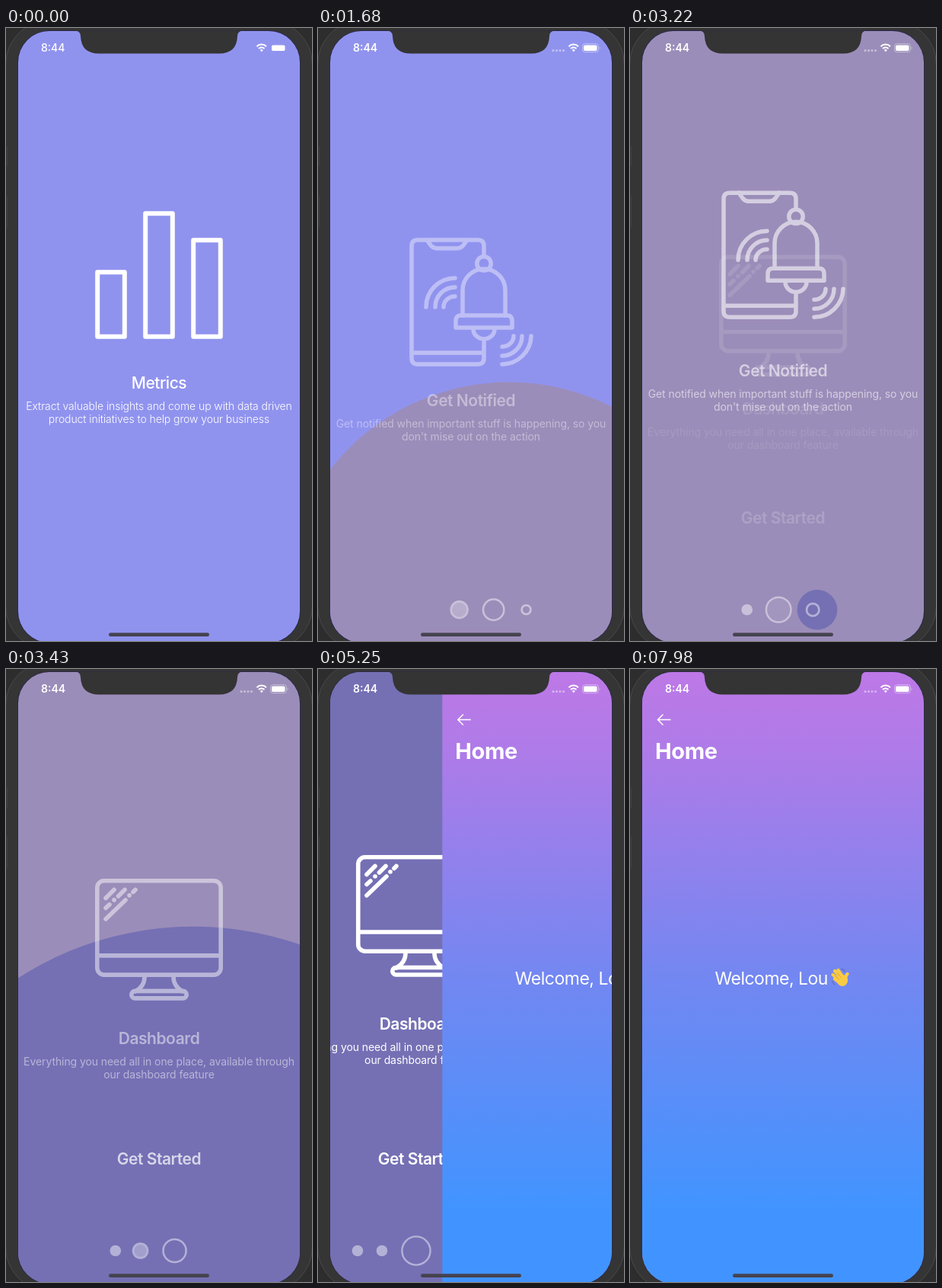
Recreate the animation shown at these times as an HTML page. Size 402 px wide and 804 px high, loop 8 s.

```html
<!DOCTYPE html>
<html lang="en">
<head>
<meta charset="utf-8">
<title>Onboarding</title>
<style>
html, body { margin: 0; width: 100%; height: 100%; overflow: hidden; background: #343434; }
svg { display: block; width: 100vw; height: 100vh; }
text { font-family: Inter, Roboto, sans-serif; fill: #fff; }
.title { font-size: 21px; font-weight: 600; letter-spacing: -.022em; text-anchor: middle; }
.body { font-size: 14px; letter-spacing: -.006em; text-anchor: middle; }
.clock { font-size: 14px; font-weight: 600; }
.thin .title, .thin .clock { font-weight: 500; }
.thin .body { font-weight: 300; }
.icon { fill: none; stroke: #fff; stroke-width: 6; stroke-linecap: round; stroke-linejoin: round; }
</style>
</head>
<body>
<svg id="stage" viewBox="0 0 402 804">
  <defs>
    <clipPath id="screen"><rect x="16" y="4" width="370" height="802" rx="41"/></clipPath>
    <linearGradient id="sky" x1="0" y1="0" x2="0" y2="1">
      <stop offset="0" stop-color="#bd78e6"/>
      <stop offset=".13" stop-color="#ae7be8"/>
      <stop offset=".5" stop-color="#7387f1"/>
      <stop offset=".88" stop-color="#4194ff"/>
    </linearGradient>
  </defs>

  <rect width="402" height="804" fill="#2d2d2d"/>
  <rect x="-.5" y="-10" width="403" height="826" rx="58" fill="#353535" stroke="#484848"/>
  <path d="M1.5 155V182M1.5 220V262" stroke="#404040"/>
  <rect x="15" y="3" width="372" height="804" rx="42" fill="#2c2a4c"/>

  <g clip-path="url(#screen)">
    <g id="intro">
      <rect id="back" width="402" height="804"/>
      <circle id="wave" cy="763"/>

      <g class="page">
        <g class="icon" stroke-width="6.5">
          <rect x="120.2" y="320.2" width="35.6" height="84.6"/>
          <rect x="183.2" y="243.2" width="35.6" height="161.6"/>
          <rect x="246.2" y="278.2" width="35.6" height="126.6"/>
        </g>
        <g class="copy">
          <text class="title" x="201" y="473">Metrics</text>
          <text class="body" x="201" y="501">Extract valuable insights and come up with data driven</text>
          <text class="body" x="201" y="518">product initiatives to help grow your business</text>
        </g>
      </g>

      <g class="page">
        <g class="icon" style="stroke-width:5.5">
          <path d="M218 262V250q0-8-8-8H131q-8 0-8 8V397q0 8 8 8H210q8 0 8-8V376M123 390H218"/>
          <path d="M143 242l5 7q3 4 8 4H183q5 0 8-4l5-7"/>
          <circle cx="218" cy="273" r="9.2"/>
          <path d="M190 341V308a28 28 0 0 1 56 0V341"/>
          <path d="M188 341H248q7 0 7 7V357H181V348q0-7 7-7Z"/>
          <path d="M204 359a14 13 0 0 0 28 0"/>
          <path d="M142 330a38 38 0 0 1 38-38M154 330a26 26 0 0 1 26-26M165 330a15 14 0 0 1 15-14"/>
          <path d="M280 368a38 38 0 0 1-38 37M268 368a26 26 0 0 1-26 26M257 368a15 14 0 0 1-15 14"/>
        </g>
        <g class="copy">
          <text class="title" x="201" y="473">Get Notified</text>
          <text class="body" x="201" y="501">Get notified when important stuff is happening, so you</text>
          <text class="body" x="201" y="518">don't mise out on the action</text>
        </g>
      </g>

      <g class="page">
        <g class="icon" style="stroke-width:5.6">
          <rect x="119.8" y="246.8" width="162.4" height="123.4" rx="9"/>
          <path d="M120 345H282M182 373q0 12-12 19M220 373q0 12 12 19"/>
          <rect x="164.8" y="391.5" width="72.4" height="9.5" rx="4.7"/>
          <path d="M131 269.500L142 258.500M131 282.500L136 278M142 272h.1M147.500 267L156 258.500M131 297L157 272M162 266h.1M167 261.500L170 258.500"/>
        </g>
        <g class="copy">
          <text class="title" x="201" y="473">Dashboard</text>
          <text class="body" x="201" y="501">Everything you need all in one place, available through</text>
          <text class="body" x="201" y="518">our dashboard feature</text>
        </g>
      </g>

      <text id="start" class="title" x="201" y="649.500">Get Started</text>
      <g id="dots" fill="#fff" stroke="#fff"><circle cy="763"/><circle cy="763"/><circle cy="763"/></g>
    </g>

    <g id="home">
      <rect x="16" y="4" width="370" height="800" fill="url(#sky)"/>
      <path d="M53.500 66.500H36.500M43.500 59.500L36.500 66.500L43.500 73.500" fill="none" stroke="#fff" stroke-width="1.500"/>
      <text x="33" y="118" font-size="29" font-weight="700" letter-spacing="-.4">Home</text>
      <text x="111.500" y="413.500" font-size="23" letter-spacing="-.5">Welcome, Lou</text>
      <g fill="none" stroke="#f9cb45" stroke-width="4.200" stroke-linecap="round">
        <path d="M277 405L269 396M279 403L273.500 395M275 408L266.500 401M275 411L269 406.500M283 407Q284 401 285.500 400"/>
        <ellipse cx="279" cy="408.500" rx="5" ry="5.500" fill="#f9cb45"/>
        <path d="M277 404L272 398.500M274.500 407L270 403" stroke="#d99a2b" stroke-width=".8"/>
        <path d="M278 393.500q3 .5 4 3M266 409.500q.5 3 3 4.500" stroke="#5d6fb4" stroke-width="1.300"/>
      </g>
    </g>

    <text class="clock" x="46" y="31">8:44</text>
    <g fill="none" stroke="#fff" stroke-width="2">
      <path d="M329.500 24.200a8.500 8.500 0 0 1 12.500 0M332 27a5.300 5.300 0 0 1 7.500 0"/>
      <path d="M333.800 29a3 3 0 0 1 4 0L335.800 31.200Z" fill="#fff" stroke="none"/>
    </g>
    <rect x="349" y="22.500" width="17.500" height="7.500" rx="1.800" fill="#fff"/>
    <g id="extras" opacity=".45">
      <g fill="#fff"><circle cx="309" cy="29.500" r="1.500"/><circle cx="313.500" cy="29.500" r="1.500"/><circle cx="318" cy="29.500" r="1.500"/><circle cx="322.500" cy="29.500" r="1.500"/></g>
      <rect x="347.500" y="20.800" width="20.800" height="10.800" rx="3" fill="none" stroke="#fff"/>
      <path d="M369.700 24.500q1.600 1.700 0 3.500Z" fill="#fff"/>
    </g>
    <rect x="135" y="793.300" width="132" height="4.700" rx="2.350" fill="#45434f"/>
  </g>
  <path d="M91 3.500Q98 4 98 11Q99 33.500 122 33.500H280Q303 33.500 304 11Q304 4 311 3.500Z" fill="#343434"/>
</svg>

<script>
const LOOP = 8000, STEP = 70;
const FLIPS = [1463, 3163], PUSH = 5080;
const COLORS = ['#9093ee', '#9b8db9', '#7570b4'];
const $ = s => document.querySelector(s), all = s => [...document.querySelectorAll(s)];
const set = (el, attrs) => { for (const k in attrs) el.setAttribute(k, attrs[k]); };
const clamp = v => Math.min(1, Math.max(0, v));
const mix = (a, b, p) => a + (b - a) * p;

// cubic Bezier timing from (0,0) to (1,1) with handles (x1,0) and (x2,1)
const bezier = (x1, x2) => v => {
  let lo = 0, hi = 1, s;
  v = clamp(v);
  if (v === 0 || v === 1) return v;
  for (let i = 0; i < 24; i++) {
    s = (lo + hi) / 2;
    const x = 3 * (1 - s) * (1 - s) * s * x1 + 3 * (1 - s) * s * s * x2 + s ** 3;
    if (x < v) lo = s; else hi = s;
  }
  return 3 * (1 - s) * s * s + s ** 3;
};
const easeIn = bezier(.42, 1), easeOut = bezier(0, .58);

const svg = $('#stage'), pages = all('.page'), dots = all('#dots circle');

function drawPages(t) {
  pages.forEach((page, i) => {
    const shown = i ? easeOut((t - FLIPS[i - 1]) / 800) : 1;
    const hidden = i < 2 ? easeOut((t - FLIPS[i]) / 200) : 0;
    const lift = 1 - shown - hidden;
    set(page, { opacity: shown * (1 - hidden) });
    set(page.children[0], { transform: `translate(0 ${60.5 * lift})` });
    set(page.children[1], { transform: `translate(0 ${38 * lift})` });
  });
}

function drawDots(from, age) {
  const size = easeOut(age / 500), gap = easeOut(age / 330);
  const left = 206 - 5 * from - 50 * easeOut(age / 800);
  dots.forEach((dot, i) => {
    const cx = i < from ? left - mix(45, 32, gap)
      : i === from ? left
      : left + 45 + (i > from + 1 ? mix(32, 45, gap) : 0);
    const open = i === from ? 1 - size : i === from + 1 ? size : 0;
    const line = mix(2.8, 2.4, open);
    set(dot, {
      cx, r: mix(7.3, 19.8, open) - line / 2, 'stroke-width': line,
      'fill-opacity': i < from ? 1 : i === from ? size : 0
    });
  });
}

function draw(t) {
  const from = t < FLIPS[1] ? 0 : 1, age = Math.max(0, t - FLIPS[from]);
  const intro = clamp(t / 210);
  svg.classList.toggle('thin', t < 140);
  set($('#back'), { fill: COLORS[from] });
  set($('#wave'), { cx: 251 - 5 * from, r: 1206 * easeIn(age / 500), fill: COLORS[from + 1] });
  drawPages(t);
  drawDots(from, age);
  set($('#start'), { opacity: easeOut((t - FLIPS[1]) / 500) });
  set($('#dots'), { opacity: .46 * intro });
  set($('#extras'), { opacity: .45 * intro });

  const push = 1 - (1 - clamp((t - PUSH) / 640)) ** 3;
  set($('#intro'), { transform: `translate(${-111 * push} 0)` });
  set($('#home'), { transform: `translate(${372 * (1 - push)} 0)` });
}

const begin = performance.now();
function tick(now) {
  const t = Math.max(0, now - begin) % LOOP;
  draw(Math.floor(t / STEP) * STEP);
  requestAnimationFrame(tick);
}
draw(0);
requestAnimationFrame(tick);
</script>
</body>
</html>
```
